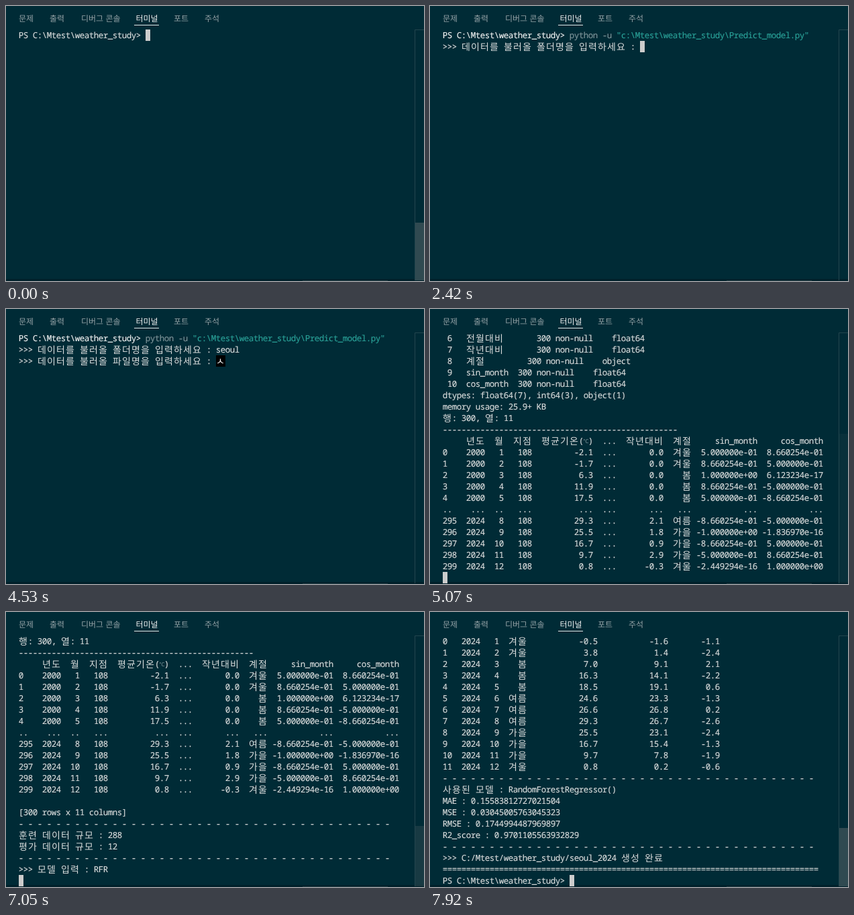
Recreate the animation shown at these times as an HTML page. Size 623 px wide and 410 px high, loop 8000 ms.

```html
<!DOCTYPE html>
<html lang="ko">
<head>
<meta charset="utf-8">
<title>Terminal</title>
<style>
  html, body { margin: 0; width: 100%; height: 100%; overflow: hidden; background: #002b36; }
  svg { display: block; width: 623px; height: 410px; }
  text { white-space: pre; text-rendering: geometricPrecision; }
  .mono { font: 500 12.5px "Noto Sans Mono", "DejaVu Sans Mono", monospace; letter-spacing: -0.5px; }
  .wide { font: 300 14px "Noto Sans CJK KR", "Noto Sans CJK", sans-serif; text-anchor: middle; }
  .tab { font: 12px "Noto Sans CJK KR", "Noto Sans CJK", sans-serif; }
</style>
</head>
<body>
<svg id="stage" viewBox="0 0 623 410">
  <rect width="623" height="410" fill="#002b36"/>
  <rect y="407" width="623" height="3" fill="#00202a"/>
  <rect x="442" y="409" width="127" height="1" fill="#243c43"/>
  <g id="tabs"></g>
  <rect x="191" y="28" width="37" height="1" fill="#e7e7e7"/>
  <path d="M623 35.5H609.5V409" fill="none" stroke="#24454e"/>
  <rect id="bar" x="610" width="13" fill="#304a51"/>
  <g id="screen"></g>
</svg>
<script>
const LOOP = 8000, LEFT = 19, TOP = 35, CELL = 7, LINE = 17, ROWS = 22;
const INK = "#dadcdc", BRIGHT = "#f4f4f4", TEAL = "#2aa198", GREY = "#7f9499";
const NS = "http://www.w3.org/2000/svg";
const byId = id => document.getElementById(id);

function add(parent, tag, attrs, content) {
  const el = document.createElementNS(NS, tag);
  for (const key in attrs) el.setAttribute(key, attrs[key]);
  if (content) el.textContent = content;
  parent.appendChild(el);
}

// Hangul takes two cells, everything else one.
const cells = s => [...s].reduce((n, c) => n + (/[\u3131-\ud7a3]/.test(c) ? 2 : 1), 0);

function alignRight(values, ends, index = "") {
  return values.reduce((line, value, i) =>
    line + " ".repeat(Math.max(0, ends[i] - cells(line) - cells(value))) + value, index);
}

const season = m => ["겨울", "봄", "여름", "가을"][Math.floor(m % 12 / 3)];
const sci = v => v.toExponential(6).replace(/([+-])(\d)$/, "$10$2");

// ---- Terminal log ----
const FOLDER = "weather_study";
const PROMPT = `PS C:\\Mtest\\${FOLDER}> `;
const ASK_DIR = ">>> 데이터를 불러올 폴더명을 입력하세요 : ";
const ASK_FILE = ">>> 데이터를 불러올 파일명을 입력하세요 : ";
const ASK_MODEL = ">>> 모델 입력 : ";
const RULE = "- ".repeat(40);

const log = [
  [[PROMPT, BRIGHT], ["python", GREY], [" -u ", GREY], [`"c:\\Mtest\\${FOLDER}\\Predict_model.py"`, TEAL]],
  ASK_DIR + "seoul",
  ASK_FILE + "서울",
  "<class 'DataFrame'>",
  "RangeIndex: 300 entries, 0 to 299",
  "Data columns (total 11 columns):",
  " #   Column     Non-Null Count  Dtype",
  "---  ------     --------------  -----"
];

["년도", "월", "지점", "평균기온(℃)", "최저기온", "최고기온", "전월대비", "작년대비", "계절", "sin_month", "cos_month"]
  .forEach((name, i) => {
    const type = i < 3 ? "int64" : i === 8 ? "object" : "float64";
    log.push(` ${String(i).padEnd(4)}${name.padEnd(11)}300 non-null    ${type}`);
  });
const infoEnd = log.length;

const dataEnds = [9, 13, 19, 32, 37, 47, 53, 67, 81];
const dataRow = (index, year, m, temp, diff) => {
  const a = 2 * Math.PI * m / 12;
  return alignRight([year, String(m), "108", temp, "...", diff, season(m), sci(Math.sin(a)), sci(Math.cos(a))],
    dataEnds, String(index));
};
log.push(
  "dtypes: float64(7), int64(3), object(1)",
  "memory usage: 25.9+ KB",
  "행: 300, 열: 11",
  "-".repeat(50),
  alignRight(["년도", "월", "지점", "평균기온(℃)", "...", "작년대비", "계절", "sin_month", "cos_month"], dataEnds),
  ...["-2.1", "-1.7", "6.3", "11.9", "17.5"].map((t, i) => dataRow(i, "2000", i + 1, t, "0.0")),
  alignRight(dataEnds.map((e, i) => i === 1 ? ".." : "..."), dataEnds, ".."),
  ...[["29.3", "2.1"], ["25.5", "1.8"], ["16.7", "0.9"], ["9.7", "2.9"], ["0.8", "-0.3"]]
    .map(([t, d], i) => dataRow(295 + i, "2024", i + 8, t, d))
);
const dataEnd = log.length;

log.push("", "[300 rows x 11 columns]", RULE, "훈련 데이터 규모 : 288", "평가 데이터 규모 : 12", RULE);
const askAt = log.length;

const resultEnds = [8, 12, 18, 33, 48, 59];
const real = [-0.5, 3.8, 7, 16.3, 18.5, 24.6, 26.6, 29.3, 25.5, 16.7, 9.7, 0.8];
const guess = [-1.6, 1.4, 9.1, 14.1, 19.1, 23.3, 26.8, 26.7, 23.1, 15.4, 7.8, 0.2];
const gap = [-1.1, -2.4, 2.1, -2.2, 0.6, -1.3, 0.2, -2.6, -2.4, -1.3, -1.9, -0.6];
log.push(
  ASK_MODEL + "RFR",
  RULE,
  alignRight(["년도", "월", "계절", "실제 평균온도", "예측 평균온도", "예측 편차"], resultEnds),
  ...real.map((r, i) => alignRight(
    ["2024", String(i + 1), season(i + 1), ...[r, guess[i], gap[i]].map(v => v.toFixed(1))], resultEnds, String(i))),
  RULE
);
const resultEnd = log.length;

log.push(
  "사용된 모델 : RandomForestRegressor()",
  "MAE : 0.15583812727021504",
  "MSE : 0.03045005763045323",
  "RMSE : 0.1744994487969897",
  "R2_score : 0.9701105563932829",
  RULE
);
const scoreEnd = log.length;
log.push(`>>> C:/Mtest/${FOLDER}/seoul_2024 생성 완료`, "=".repeat(80));

// ---- Timeline: start, finished lines, current line, options ----
const states = [
  [0, 0, PROMPT, { barY: 323, bar: 1 }],
  [330, 0, PROMPT, { barY: 323, bar: 0.5 }],
  [680, 0, PROMPT],
  [890, 1, "", { noCursor: true }],
  [960, 1, ""],
  [2420, 1, ASK_DIR],
  ...[2950, 3080, 3210, 3340, 3870].map((t, i) => [t, 1, ASK_DIR + "seoul".slice(0, i + 1)]),
  [4070, 2, ASK_FILE],
  [4530, 2, ASK_FILE, { compose: "ㅅ" }],
  [4600, 2, ASK_FILE, { compose: "서" }],
  [4740, 2, ASK_FILE + "서울"],
  [4810, 3, ""],
  [5000, infoEnd, ""],
  [5070, dataEnd, "", { barY: 186, bar: 0.2 }],
  [5140, askAt, ASK_MODEL],
  ...[5820, 5960, 6240].map((t, i) => [t, askAt, ASK_MODEL + "RFR".slice(0, i + 1)]),
  [7050, askAt + 1, "", { barY: 319, bar: 0.5 }],
  [7120, resultEnd, "", { barY: 320, bar: 1 }],
  [7190, scoreEnd, "", { barY: 320, bar: 1 }],
  [7650, scoreEnd + 1, "", { barY: 321, bar: 1 }],
  [7720, scoreEnd + 2, "", { barY: 322, bar: 1 }],
  [7920, scoreEnd + 2, PROMPT, { barY: 322, bar: 1 }]
];

// ---- Drawing ----
const screen = byId("screen"), bar = byId("bar");

function drawText(text, col, row, fill) {
  const y = TOP + row * LINE;
  for (const run of text.matchAll(/[\u3131-\ud7a3]+|℃|[^\s℃\u3131-\ud7a3]+/g)) {
    const x = LEFT + (col + cells(text.slice(0, run.index))) * CELL, s = run[0];
    if (s === "℃") {
      add(screen, "text", { class: "wide", x: x + 3.5, y: y + 12, fill: GREY, style: "font-size:8px" }, s);
    } else if (cells(s) > s.length) {
      const xs = [...s].map((c, i) => x + 6.5 + i * 2 * CELL).join(" ");
      add(screen, "text", { class: "wide", x: xs, y: y + 14, fill }, s);
    } else {
      add(screen, "text", { class: "mono", x: x - 0.25, y: y + 13, fill, stroke: fill, "stroke-width": 0.15 }, s);
    }
  }
}

function drawLine(line, row) {
  let col = 0;
  for (const [text, fill] of typeof line === "string" ? [[line, INK]] : line) {
    drawText(text, col, row, fill);
    col += cells(text);
  }
  return col;
}

let shown;
function render(time) {
  const state = states.findLast(s => s[0] <= time);
  if (state === shown) return;
  shown = state;
  const [, done, current, { barY = 323, bar: opacity = 0, noCursor, compose } = {}] = state;
  const first = Math.max(0, done + 1 - ROWS);
  screen.replaceChildren();
  log.slice(first, done).forEach(drawLine);

  const row = done - first, col = drawLine(current, row);
  const block = { x: LEFT + col * CELL, y: TOP + row * LINE, height: LINE };
  if (compose) {
    add(screen, "rect", { ...block, width: 2 * CELL, fill: "#000" });
    drawText(compose, col, row, "#fff");
  } else if (!noCursor) {
    add(screen, "rect", { ...block, width: CELL, fill: "#cccccc" });
  }
  bar.setAttribute("y", barY);
  bar.setAttribute("height", 409 - barY);
  bar.setAttribute("opacity", opacity);
}

[["문제", 19], ["출력", 65], ["디버그 콘솔", 112], ["터미널", 193.5], ["포트", 250], ["주석", 296]].forEach(([name, x]) =>
  add(byId("tabs"), "text", { class: "tab", x, y: 23, fill: name === "터미널" ? "#f0f0f0" : "#93a1a5" }, name));

const start = performance.now();
function tick() {
  render((performance.now() - start) % LOOP);
  requestAnimationFrame(tick);
}
tick();
</script>
</body>
</html>
```
